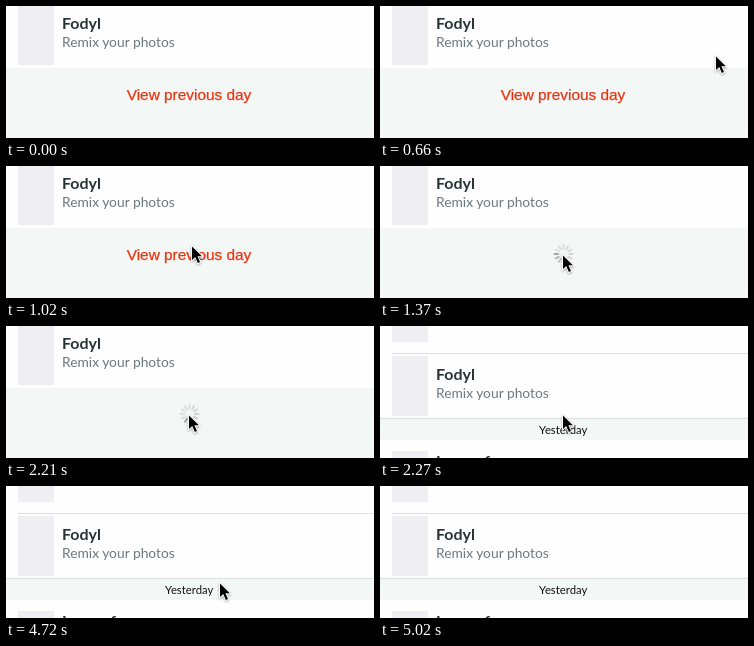
Recreate the animation shown at these times as an HTML page. Size 368x132 px, loop 5330 ms.

```html
<!DOCTYPE html>
<html lang="en">
<head>
<meta charset="utf-8">
<title>View previous day</title>
<style>
  html, body { margin: 0; width: 100%; height: 100%; overflow: hidden; background: #fefefe; }
  svg { display: block; width: 368px; height: 132px; }
  text { font-family: Lato, sans-serif; }
  .name { font-size: 16px; font-weight: 700; fill: #26343a; }
  .tagline { font-size: 13.8px; fill: #6c7780; }
  .day { font-size: 11.3px; fill: #111; text-anchor: middle; }
  .link { font: 15.4px "Liberation Sans", Arial, sans-serif; fill: #ea3410; stroke: #ea3410; stroke-width: .25; text-anchor: middle; }
  .thumb { fill: #eeeef3; }
  .panel { fill: #f3f7f6; }
  .rule { fill: #dedfe0; }
  #spinner path { stroke: #000; stroke-width: 1.7; stroke-linecap: round; }
  #cursor path { stroke: #fff; stroke-width: 1.8; paint-order: stroke; filter: drop-shadow(0 1px 1px #0005); }
</style>
</head>
<body>
<svg viewBox="0 0 368 132">
  <defs>
    <g id="row">
      <rect class="thumb" x="12" y="-1" width="36" height="60"/>
      <text class="name" x="56" y="23">Fodyl</text>
      <text class="tagline" x="56" y="41">Remix your photos</text>
    </g>
  </defs>
  <rect width="368" height="132" fill="#fefefe"/>

  <g id="before">
    <use href="#row"/>
    <rect class="panel" y="62" width="368" height="70"/>
    <text class="link" id="link" x="183" y="94">View previous day</text>
    <g id="loader" transform="translate(183.5 88)"><g id="spinner"></g></g>
  </g>

  <g id="after">
    <rect class="thumb" x="12" width="36" height="16"/>
    <rect class="rule" x="12" y="27" width="356" height="1"/>
    <use href="#row" y="31"/>
    <rect class="panel" y="92" width="368" height="22"/>
    <rect class="rule" y="92" width="368" height="1"/>
    <text class="day" x="183.2" y="107.5">Yesterday</text>
    <rect class="thumb" x="12" y="125" width="36" height="7"/>
    <text class="name" x="56" y="140.5">Iumsarf</text>
  </g>

  <g id="cursor"><path d="M1 1.4V15L4.2 12L6.9 18L9 17.1L6.4 11.3H10.9Z"/></g>
</svg>
<script>
const LOOP = 5330, TICK = 60;
const byId = id => document.getElementById(id);

function play(id, frames) {
  byId(id).animate(frames, { duration: LOOP, iterations: Infinity });
}

// Visible from one time up to another, with hard cuts.
function showBetween(id, start, end) {
  const at = (time, visibility) =>
    ({ offset: time / LOOP, visibility, easing: 'steps(1, end)' });
  play(id, [at(0, 'hidden'), at(start, 'visible'), at(end, 'hidden'), at(LOOP, 'hidden')]);
}
showBetween('link', 0, 1370);
showBetween('loader', 1370, 2270);
showBetween('before', 0, 2270);
showBetween('after', 2270, LOOP);
showBetween('cursor', 660, 5020);

// The darkest spoke leads clockwise and a trail fades behind it.
const SPOKES = 12;
for (let i = 0; i < SPOKES; i++) {
  const spoke = document.createElementNS('http://www.w3.org/2000/svg', 'path');
  spoke.setAttribute('d', 'M0 -5.4V-9.1');
  spoke.setAttribute('transform', `rotate(${-360 / SPOKES * i})`);
  spoke.setAttribute('stroke-opacity', 0.12 + 0.27 * 0.7 ** i);
  byId('spinner').append(spoke);
}
byId('spinner').animate(
  { transform: ['rotate(0deg)', 'rotate(360deg)'] },
  { duration: 1000, iterations: Infinity, easing: `steps(${SPOKES})` }).cancel();
play('spinner', [
  { offset: 0, transform: 'rotate(270deg)' },
  { offset: 1370 / LOOP, transform: 'rotate(270deg)', easing: `steps(${SPOKES})` },
  { offset: 2370 / LOOP, transform: 'rotate(630deg)' },
  { offset: 1, transform: 'rotate(630deg)' },
]);

const speedUp = u => u ** 1.6;
const slowDown = u => 1 - (1 - u) ** 2;

// Pointer positions sampled once per tick along an eased move.
function glide(start, end, from, to, easeX, easeY) {
  const frames = [];
  for (let time = start; time <= end; time += TICK) {
    const u = (time - start) / (end - start);
    const x = Math.round(from.x + (to.x - from.x) * easeX(u));
    const y = Math.round(from.y + (to.y - from.y) * easeY(u));
    frames.push({ offset: time / LOOP, transform: `translate(${x}px, ${y}px)`, easing: 'steps(1, end)' });
  }
  return frames;
}
const entry = { x: 335, y: 49 }, rest = { x: 182, y: 88 }, exit = { x: 331, y: 128 };
play('cursor', [
  ...glide(660, 1080, entry, rest, slowDown, speedUp),
  ...glide(4490, 4970, rest, exit, speedUp, speedUp),
]);
</script>
</body>
</html>
```
